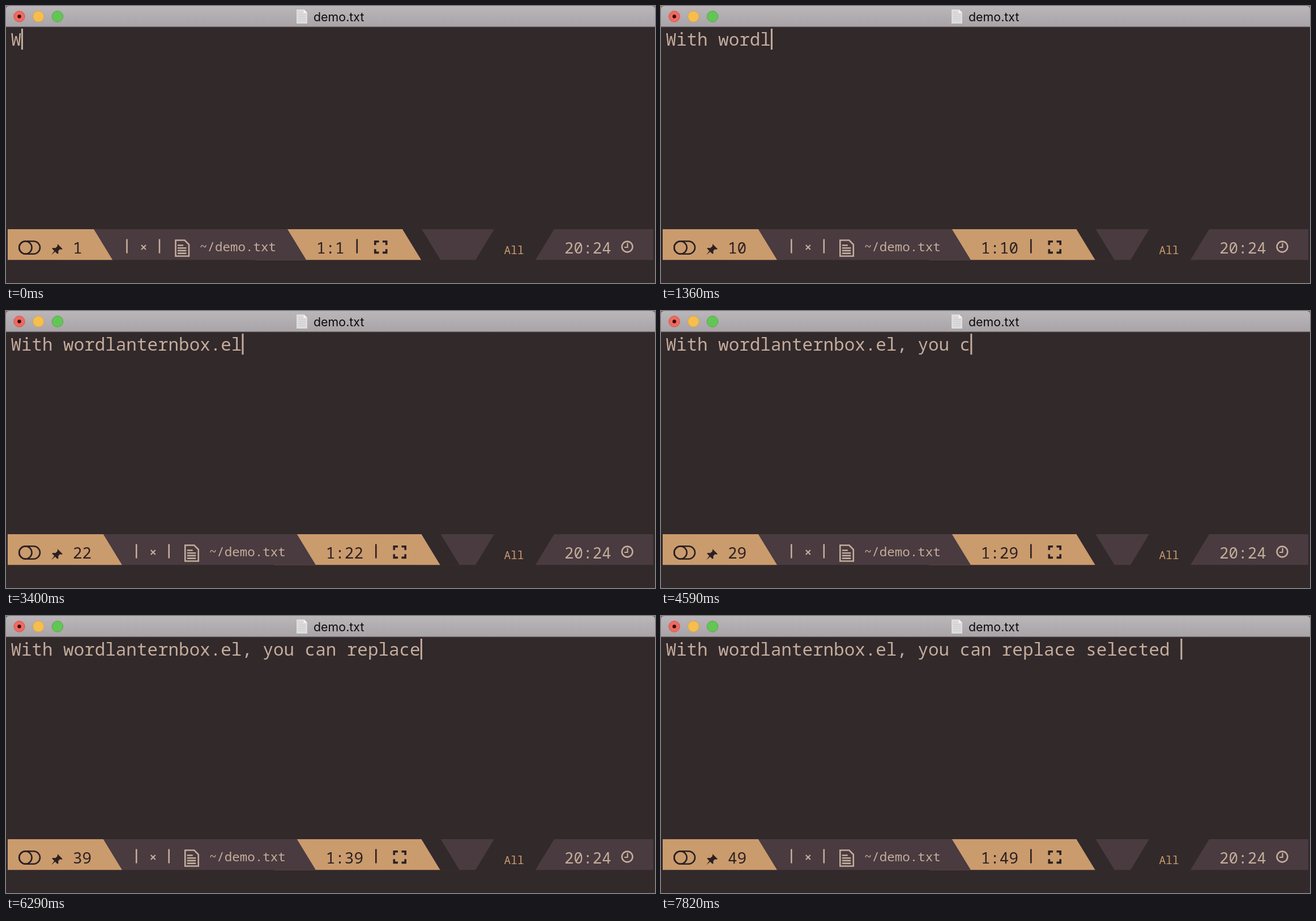
Recreate the animation shown at these times as an HTML page. Size 1146 px wide and 489 px high, loop 7990 ms.

```html
<!DOCTYPE html>
<html lang="en">
<head>
<meta charset="utf-8">
<title>demo.txt</title>
<style>
  html, body { margin: 0; width: 100%; height: 100%; overflow: hidden; background: #32292b; }
  svg { display: block; width: 100%; height: 100%; }
  text { font-family: "Noto Sans Mono", "DejaVu Sans Mono", monospace; font-weight: 500; white-space: pre; }
  .title { font: 400 21.4px Inter, "Liberation Sans", sans-serif; fill: #0c0b0c; }
  .big { font-size: 27.6px; }
  .bg { fill: #32292b; }
  .tan { fill: #ca9b6d; }
  .plum { fill: #493b3f; }
  .pale { fill: #c4ad9d; }
  .ink { fill: #2b2022; }
  .line { fill: none; stroke-width: 2.6; }
  .line.pale { fill: none; stroke: #c4ad9d; }
  .line.ink { fill: none; stroke: #2b2022; }
</style>
</head>
<body>
<svg viewBox="0 0 1146 489" preserveAspectRatio="none">
  <defs>
    <linearGradient id="chrome" x2="0" y2="1">
      <stop offset="0" stop-color="#bbb6b9"/>
      <stop offset="1" stop-color="#a8a3a6"/>
    </linearGradient>
    <clipPath id="bar"><rect x="3" y="394" width="1140" height="54.5"/></clipPath>
  </defs>

  <!-- title bar -->
  <rect width="1146" height="20" fill="#6b6965"/>
  <path d="M0 37V6Q0 0 6 0H1140Q1146 0 1146 6V37Z" fill="url(#chrome)"/>
  <rect y="36.4" width="1146" height="1" fill="#5b5456"/>
  <g stroke-width="1">
    <circle cx="23.5" cy="18.5" r="9.7" fill="#ee6a5f" stroke="#d3574e"/>
    <circle cx="57.3" cy="18.5" r="9.7" fill="#f6be4f" stroke="#d9a641"/>
    <circle cx="91" cy="18.5" r="9.7" fill="#62c655" stroke="#52a846"/>
  </g>
  <circle cx="23.5" cy="18.5" r="3.2" fill="#3c0907"/>
  <path d="M513 6H526L532 12V31H513Z" fill="#dedddd"/>
  <path d="M526 6V12H532Z" fill="#f7f7f7"/>
  <path d="M516 12H524M516 15.5H529M516 19H529M516 22.5H529M516 26H529" stroke="#c9c8c8"/>
  <text class="title" x="543" y="26.5">demo.txt</text>

  <!-- buffer -->
  <text id="typed" class="pale" x="8.4" y="69.5" font-size="30.92"></text>
  <rect id="cursor" class="pale" y="40" width="3" height="37"/>

  <!-- status line -->
  <g clip-path="url(#bar)">
    <path class="plum" d="M720 394H862L829 448.5H720Z"/>
    <path class="plum" d="M968 394H1143V448.5H934.7Z"/>
    <g id="right">
      <path class="bg" d="M660 394H734L767.3 448.5H660Z"/>
      <path class="tan" d="M440 394H700L733.3 448.5H440Z"/>
      <rect class="ink" x="618.5" y="411.5" width="2.6" height="25"/>
      <path class="line ink" stroke-width="3.4" style="stroke-width:3.6"
        d="M658.5 415.8H651.8V422M665 415.8H671.7V422M658.5 435.4H651.8V429.2M665 435.4H671.7V429.2"/>
    </g>
    <g id="left">
      <path class="plum" d="M100 394H497L530.3 448.5H100Z"/>
      <path class="tan" d="M-30 394H155L188.3 448.5H-30Z"/>
      <path class="pale" d="M212.2 411.5h2.6v25h-2.6ZM269.7 411.5h2.6v25h-2.6Z"/>
      <path class="line pale" style="stroke-width:2.2" d="M239 422L247 430M247 422L239 430"/>
      <path class="line pale" d="M299.5 413.5H315.5L323 421V441.5H299.5Z"/>
      <path class="line pale" d="M303 422.5H313M303 427.2H318.5M303 431.9H318.5M303 436.6H318.5"/>
      <text class="pale" x="342" y="433" font-size="22.5">~/demo.txt</text>
      <text id="place" class="ink big" x="548" y="437">1:1</text>
    </g>
    <rect class="line ink" x="23.2" y="415.3" width="36.8" height="22.4" rx="11.2"/>
    <circle class="line ink" cx="34.4" cy="426.5" r="11.2"/>
    <path class="ink" d="M91 420L100 429L97.3 430L95.5 429.3L92.3 432.3L92.5 437L90.5 437.5L86.8 433.8L80 439.5L85.3 432.3L81.3 428.3L82.3 427L87.3 427.2L90.8 424Z"/>
    <text id="column" class="ink big" x="118" y="437"></text>
    <text class="pale big" x="986" y="436.5">20:24</text>
    <circle class="line pale" cx="1097" cy="425" r="9.4"/>
    <path class="line pale" style="stroke-width:2.2" d="M1097.5 418.5V426H1092"/>
  </g>
  <text class="tan" x="879.5" y="438" font-size="19.5">All</text>
</svg>
<script>
  const STEP = 170, LOOP = 7990, ADVANCE = 18.55, CELL = 16.75;
  const sentence = "With wordlanternbox.el, you can replace selected ";
  const el = id => document.getElementById(id);
  const [typed, cursor, column, place, left, right] =
    ["typed", "cursor", "column", "place", "left", "right"].map(el);
  const shift = (group, x) => group.setAttribute("transform", `translate(${x} 0)`);

  function draw(now) {
    const step = Math.floor(now % LOOP / STEP);
    // one key per step, with two quick double strokes
    const count = step + 1 + (step >= 4) + (step >= 42);
    typed.textContent = sentence.slice(0, count);
    cursor.setAttribute("x", 8.4 + ADVANCE * count);
    column.textContent = count;
    place.textContent = "1:" + count;
    // a second digit widens both counters
    const extra = count > 9 ? CELL : 0;
    shift(left, extra);
    shift(right, 2 * extra);
    requestAnimationFrame(tick);
  }

  const start = performance.now();
  const tick = () => draw(performance.now() - start);
  tick();
</script>
</body>
</html>
```
